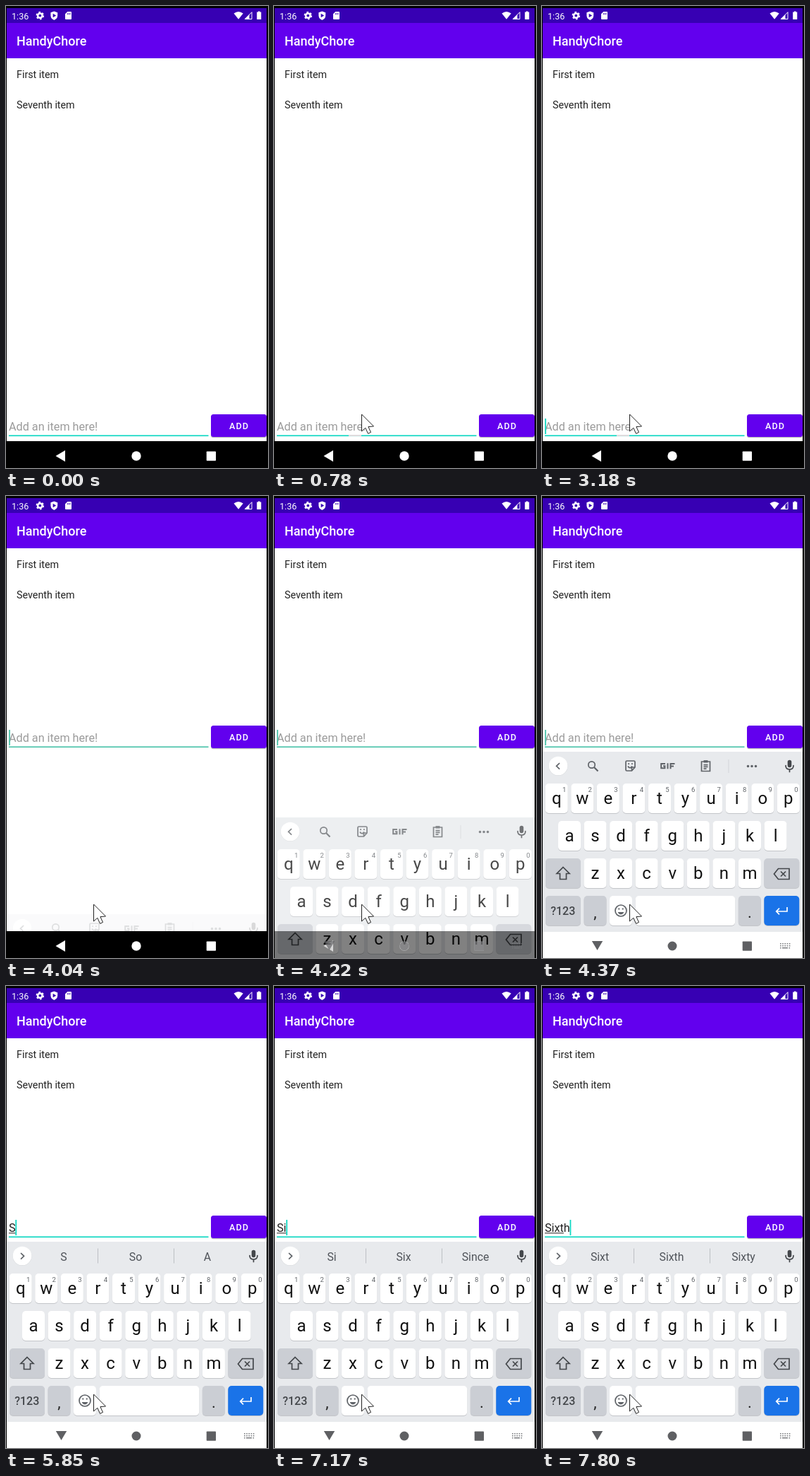
An HTML page that plays this animation: 372 px wide and 654 px high, repeating every 8000 ms.

```html
<!DOCTYPE html>
<html lang="en">
<head>
<meta charset="utf-8">
<title>Todo list</title>
<style>
html, body { margin: 0; width: 100%; height: 100%; overflow: hidden; background: #000; }
svg { display: block; width: 372px; height: 654px; font-family: Roboto, sans-serif; }
.mid { text-anchor: middle; }
.med { font-weight: 500; }
.line { fill: none; stroke: #5f6368; stroke-width: 1.7; }
</style>
</head>
<body>
<svg viewBox="0 0 372 654" xmlns="http://www.w3.org/2000/svg">
  <rect width="372" height="654"/>
  <rect x="1" y="3" width="369" height="613" fill="#fff"/>
  <rect x="1" y="3" width="369" height="21" fill="#3700b3"/>
  <rect x="1" y="24" width="369" height="50" fill="#6200ee"/>

  <g fill="#fff">
    <text x="8" y="18.5" font-size="12.6">1:36</text>
    <g fill="none" stroke="#fff">
      <circle cx="48.3" cy="13.6" r="3.2" stroke-width="2.5"/>
      <circle cx="48.3" cy="13.6" r="4.9" stroke-width="1.8" stroke-dasharray="2.6 2.53"/>
    </g>
    <path d="M68.3 7.4L73.2 9.3V13.5Q73 18 68.3 20Q63.600 18 63.4 13.5V9.300Z"/>
    <path d="M66.600 10.700L71.200 13.500L66.600 16.300Z" fill="#3700b3"/>
    <path d="M87.300 8H92Q93 8 93 9V18Q93 19 92 19H85Q84 19 84 18V11.300Z"/>
    <path d="M87.300 10V12.300M89.200 10V12.300M91.100 10V12.300" stroke="#3700b3" stroke-width=".9"/>
    <path d="M323.500 10.500Q330 5.300 336.700 10.500L330.100 18.700Z"/>
    <path d="M349 8.700V18.500H339.200Z" fill="none" stroke="#fff"/>
    <path d="M345.500 12V18.500H339Z"/>
    <path d="M358 7.500H360.500V8.600H362.300V19H356.200V8.600H358Z"/>
    <text class="med" x="15" y="56" font-size="18">HandyChore</text>
  </g>

  <g font-size="14.3" fill="#222">
    <text x="15" y="101.500">First item</text>
    <text x="15" y="144.500">Seventh item</text>
  </g>

  <g id="form">
    <text id="hint" x="4" y="601.300" font-size="16.200" fill="#9b9b9b">Add an item here!</text>
    <text id="typed" x="4" y="601.300" font-size="16.200" fill="#222"></text>
    <rect id="mark" x="4" y="602.300" height="1" fill="#222"/>
    <rect id="field" x="4" y="607.400" width="283.500" height="1.700"/>
    <rect id="smear" x="106" y="607" width="18" height="2" fill="#dedbdd"/>
    <rect id="caret" y="584" width="1.800" height="22"/>
    <rect x="291" y="579" width="79" height="32.300" rx="3.500" opacity=".25"/>
    <rect x="291" y="578" width="79" height="32" rx="3.500" fill="#6200ee"/>
    <text class="med" x="317" y="598.700" font-size="12.600" letter-spacing="1.120" fill="#fff">ADD</text>
  </g>

  <g id="keyboard">
    <rect x="1" y="362" width="369" height="255" fill="#e8eaed"/>
    <rect x="1" y="617" width="369" height="37" fill="#fff"/>
    <circle cx="23" cy="382.500" r="13.500" y="1" opacity=".08"/>
    <circle cx="23" cy="382" r="13.300" fill="#fff"/>
    <path id="chevron" class="line"/>
    <g id="tools" class="line">
      <circle cx="70.500" cy="380.500" r="4.700"/>
      <path d="M74 384L79.500 389.500" stroke-width="2.200"/>
      <path d="M120.500 375H130.500Q132 375 132 376.500V384L127.500 389H120.500Q119 389 119 387.500V376.500Q119 375 120.500 375ZM132 384H127.500V389M122 382.500Q124.500 387 128 382.500"/>
      <path d="M122.200 379.200H124M127 379.200H128.800"/>
      <path d="M175 379H169.200V385.300H174.400V382.200H172M178.500 378.200V386.200M182.500 386.200V379H188.500M182.500 382.500H187" stroke-width="2"/>
      <path d="M226.500 376H238.500V389.500H226.500ZM229.500 380.700H235.500M229.500 383.400H235.500M229.500 386.100H233.500"/>
      <path d="M229.500 375.800H235.500" stroke-width="3.400"/>
      <path d="M265 373V392" stroke="#d3d5d9" stroke-width="1"/>
      <path d="M291 382.500H305" stroke-width="3.600" stroke-linecap="round" stroke-dasharray="0 5.500" stroke-dashoffset="-1.500"/>
    </g>
    <g id="words" class="mid" font-size="15.800" fill="#50545a">
      <path d="M130.500 371.500V392.500M238.500 371.500V392.500" stroke="#bcbfc4"/>
      <text x="82" y="388.500"></text>
      <text x="184" y="388.500"></text>
      <text x="286" y="388.500"></text>
    </g>
    <g class="line" stroke-linecap="round">
      <path d="M351.500 376.500V381.500" stroke="#44474b" stroke-width="5.600"/>
      <path d="M346 381.500Q346 387 351.500 387Q357 387 357 381.500M351.500 387V390.500" stroke="#44474b"/>
    </g>
    <g id="keys"></g>
    <g class="line">
      <path d="M30 525.500L39 534.500H34.500V542.500H25.500V534.500H21Z" stroke="#44474b"/>
      <path d="M335.500 527.500H351V542.500H335.500L329.500 535ZM339 531.500L346 538.500M346 531.500L339 538.500" stroke="#44474b"/>
      <circle cx="112" cy="587" r="8"/>
      <path d="M108 589.500Q112 594.500 116 589.500Z" fill="#5f6368" stroke-width="1"/>
      <path d="M108.300 584.500H110.300M113.700 584.500H115.700" stroke-width="2"/>
      <path d="M348 582V588H333M337 583.700L332.700 588L337 592.300" stroke="#fff"/>
    </g>
  </g>

  <g id="darkNav">
    <rect x="1" y="616" width="369" height="38"/>
    <g fill="#fff">
      <path d="M70.500 637L84 629V645Z"/>
      <circle cx="185" cy="637" r="6.700"/>
      <rect x="284.700" y="630.500" width="13.300" height="13.300" rx=".8"/>
    </g>
  </g>
  <g id="lightNav" fill="#5f6063">
    <path d="M70.800 630H86.200L78.500 643Z"/>
    <circle cx="185" cy="637" r="6.500"/>
    <rect x="284.700" y="630.500" width="13.300" height="13.300" rx=".8"/>
    <path d="M338 633.700H352.500M338 636.700H352.500M338 639.700H339.500M350.500 639.700H352.500" stroke="#77797c" stroke-width="1.500" stroke-dasharray="1.600 1.600"/>
    <path d="M341 639.700H349" stroke="#77797c" stroke-width="1.500"/>
  </g>
  <path d="M.5 0V654M371 0V654" stroke="#000" stroke-width="1"/>
  <rect x="370" width="2" height="654"/>

  <circle id="tap" cx="124" cy="578" r="18" fill="#ff0" opacity=".47"/>
  <path id="mouse" d="M0 0V24L5.300 19.200L9 27.300L13 25.500L9.400 17.600L17 17Z" fill="#fff" stroke="#222" stroke-linejoin="round"/>
</svg>
<script>
const LOOP = 8000;
const el = id => document.getElementById(id);
const show = (id, on) => el(id).setAttribute("display", on ? "inline" : "none");
const set = (id, name, value) => el(id).setAttribute(name, value);

// Latest [time, ...values] entry that has started
const at = (list, t) => list.filter(e => e[0] <= t).pop();

// time, tip x, tip y
const pointer = [
  [70, 103.5, 645], [150, 104.5, 628], [230, 106.5, 610], [300, 111.5, 599],
  [380, 118.5, 591], [530, 120.5, 588], [600, 122.5, 584], [680, 123.5, 580], [780, 124.5, 578]
];
// time, keyboard offset, keyboard opacity, dark bar opacity
const slide = [
  [0, 292, 0, 1], [4040, 230, .2, 1], [4120, 165, .5, .7],
  [4220, 93, .76, .33], [4270, 35, .92, .12], [4370, 0, 1, 0]
];
const blinks = [300, 780, 1260, 1720, 2250, 2730, 3180, 3740, 3810, 5370, 5850, 6620, 7170];
const typing = [[0, 0], [4670, 1], [5920, 2], [7240, 3], [7640, 4], [7800, 5]];
const marked = [[0, 0], [4820, 1], [6170, 2], [7470, 3], [7800, 4]];
const guesses = [
  [4820, "S", "So", "A"], [6170, "Si", "Six", "Since"],
  [7470, "Six", "Sixth", "Sir"], [7800, "Sixt", "Sixth", "Sixty"]
];

function key(x, y, w, fill = "#fff") {
  const box = (dy, color) => `<rect x="${x}" y="${y + dy}" width="${w}" height="42" rx="5" fill="${color}"/>`;
  return box(1, "#c3c5c9") + box(0, fill);
}

function label(x, y, size, text, extra = "") {
  return `<text class="mid" x="${x}" y="${y}" font-size="${size}" ${extra}>${text}</text>`;
}

function buildKeys() {
  const pitch = 36.57, grey = "#cbced4";
  let out = "";
  [["qwertyuiop", 20.7, 407], ["asdfghjkl", 39, 460], ["zxcvbnm", 75.5, 513]].forEach(([row, x0, y], r) => {
    [...row].forEach((c, i) => {
      const x = x0 + i * pitch;
      out += key(x - 16, y, 32) + label(x, y + 29, 24, c, 'fill="#111"');
      if (r === 0) out += label(x + 11, y + 11.5, 9.5, (i + 1) % 10, 'class="mid med" fill="#5f6368"');
    });
  });
  out += key(5, 513, 50, grey) + key(315.3, 513, 50, grey);
  out += key(5, 566, 50, grey) + key(59.5, 566, 32, grey) + key(96, 566, 32);
  out += key(132.7, 566, 141.5) + key(278.8, 566, 32, grey) + key(315.3, 566, 50, "#1a73e8");
  out += label(29.7, 593, 16, "?123", 'font-weight="500" fill="#44474b"');
  out += label(75.5, 597, 22, ",", 'fill="#222"') + label(294.8, 597, 22, ".", 'fill="#222"');
  el("keys").innerHTML = out;
}

function draw(t) {
  const tip = at(pointer, t);
  show("mouse", tip);
  if (tip) set("mouse", "transform", `translate(${tip[1]} ${tip[2]})`);
  show("tap", t >= 3740 && t < 3810);
  show("smear", t >= 380 && t < 4040);

  const [, drop, alpha, dark] = at(slide, t);
  set("form", "transform", `translate(0 ${t < 4040 ? 0 : -253})`);
  set("keyboard", "transform", `translate(0 ${drop})`);
  set("keyboard", "opacity", alpha);
  set("darkNav", "opacity", dark);
  set("lightNav", "opacity", 1 - dark);

  const count = at(typing, t)[1], typed = el("typed");
  const widthOf = n => n ? typed.getSubStringLength(0, n) : 0;
  typed.textContent = "Sixth".slice(0, count);
  show("hint", count === 0);
  set("mark", "width", widthOf(at(marked, t)[1]));
  set("caret", "x", 4.1 + widthOf(count) - (count ? .4 : 0));
  show("caret", blinks.filter(b => b <= t).length % 2);
  const accent = t >= 4040 && t < 4670 ? "#4dc4ab" : "#12d8c3";
  set("caret", "fill", accent);
  set("field", "fill", accent);

  const guess = at(guesses, t);
  show("tools", !guess);
  show("words", guess);
  set("chevron", "d", guess ? "M21 378L25.500 382.300L21 386.600" : "M25 378L20.500 382.300L25 386.600");
  if (guess) el("words").querySelectorAll("text").forEach((w, i) => w.textContent = guess[i + 1]);
}

function tick() {
  draw(performance.now() % LOOP);
  requestAnimationFrame(tick);
}

buildKeys();
tick();
</script>
</body>
</html>
```
